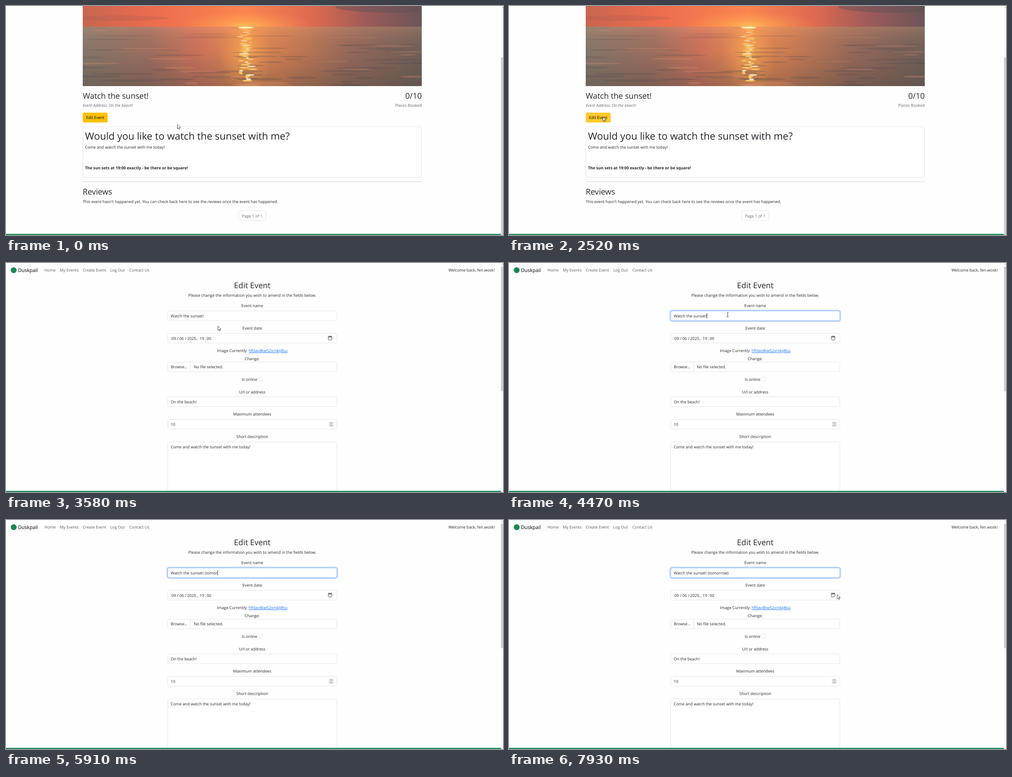
Write an HTML page that moves like this. It is 1101 px wide and 509 px high and loops after 8 s.

```html
<!DOCTYPE html>
<html lang="en">
<head>
<meta charset="utf-8">
<title>Edit event</title>
<style>
  html, body { margin: 0; width: 100%; height: 100%; overflow: hidden; background: #fefefe; }
  svg { display: block; width: 1101px; height: 509px; }
  text {
    font: 8.79px "Open Sans", "Noto Sans", sans-serif;
    fill: #212529; white-space: pre; text-rendering: geometricPrecision;
  }
  .h1 { font-size: 21.97px; }
  .h2 { font-size: 17.57px; }
  .brand { font-size: 10.98px; fill: #000; }
  .b { font-weight: 700; }
  .i { font-style: italic; }
  .muted { fill: #62666a; }
  .nav { fill: #595959; }
  .black { fill: #000; }
  .small { font-size: 7.4px; }
  .link { fill: #0d6efd; text-decoration: underline; }
  .mid { text-anchor: middle; }
  .end { text-anchor: end; }
  .box { fill: #fff; stroke: #dee2e6; stroke-width: .9; }
</style>
</head>
<body>
<svg id="stage" viewBox="0 0 1101 509">
  <defs>
    <clipPath id="frame"><path d="M170 0H921V178H170Z"/></clipPath>
    <linearGradient id="sky">
      <stop offset="0" stop-color="#c8654f"/>
      <stop offset=".2" stop-color="#ec6c4e"/>
      <stop offset=".48" stop-color="#fb8450"/>
      <stop offset=".68" stop-color="#dd6950"/>
      <stop offset=".85" stop-color="#985a59"/>
      <stop offset="1" stop-color="#6b5558"/>
    </linearGradient>
    <linearGradient id="sea">
      <stop offset="0" stop-color="#87796c"/>
      <stop offset=".2" stop-color="#a1705f"/>
      <stop offset=".34" stop-color="#d4745a"/>
      <stop offset=".48" stop-color="#f0924f"/>
      <stop offset=".6" stop-color="#d57f52"/>
      <stop offset=".78" stop-color="#9b6b59"/>
      <stop offset="1" stop-color="#716059"/>
    </linearGradient>
    <linearGradient id="depth" x2="0" y2="1">
      <stop offset="0" stop-color="#ffb08a" stop-opacity=".2"/>
      <stop offset=".4" stop-color="#5b4d4c" stop-opacity=".08"/>
      <stop offset="1" stop-color="#45413f" stop-opacity=".4"/>
    </linearGradient>
    <radialGradient id="glow">
      <stop offset="0" stop-color="#ffd966"/>
      <stop offset=".3" stop-color="#ffae4f" stop-opacity=".8"/>
      <stop offset="1" stop-color="#ff9450" stop-opacity="0"/>
    </radialGradient>
  </defs>
  <g id="detail"></g>
  <g id="form"></g>
  <path d="M0 506.5H1097V509H0Z" fill="#198754"/>
  <path d="M1096.5 0H1101V509H1096.5Z" fill="#fafafa"/>
  <rect id="thumb" x="1096.5" width="4.5" fill="#cdcdcd"/>
  <path d="M1098.5 4L1100 2.5L1101 3.5" fill="none" stroke="#777" stroke-width=".9"/>
  <g id="mouse"></g>
</svg>
<script>
const $ = id => document.getElementById(id);

const text = (x, y, str, cls = '') => `<text x="${x}" y="${y}" class="${cls}">${str}</text>`;
const box = (x, y, w, h, r = 3.5) =>
  `<rect x="${x}" y="${y}" width="${w}" height="${h}" rx="${r}" class="box"/>`;
const blob = (x, y, rx, ry, fill, alpha = 1) =>
  `<ellipse cx="${x}" cy="${y}" rx="${rx}" ry="${ry}" fill="${fill}" opacity="${alpha}"/>`;

let seed = 11;
const rand = () => (seed = seed * 16807 % 2147483647) / 2147483647;

function photo() {
  let out = '<path d="M170 0H921V46H170Z" fill="url(#sky)"/>' +
    blob(860, 2, 130, 13, '#5d5058', .45) + blob(250, 27, 110, 6, '#a85e55', .3) +
    blob(531, 44, 150, 34, 'url(#glow)', .75) +
    '<path d="M170 46H921V178H170Z" fill="url(#sea)"/>' +
    '<path d="M170 46H921V178H170Z" fill="url(#depth)"/>' +
    blob(531, 100, 60, 95, 'url(#glow)', .5);
  for (let i = 0; i < 75; i++) {
    const d = rand(), x = 170 + rand() * 751;
    const dark = rand() < .65;
    out += blob(x, 49 + d * 128, 14 + rand() * 60, .5 + d * 2.4,
      dark ? '#4b4a4b' : '#f59a70', dark ? .25 : .22);
  }
  for (let i = 0; i < 38; i++) {
    const d = i / 38;
    const spread = 14 + 8 * Math.sin(d * 11);
    out += blob(532 + (rand() - .5) * spread * 1.5, 49 + d * 120, 3 + rand() * 10, .6 + d * 1.3,
      i % 3 ? '#ffd873' : '#fff6cf', .85);
  }
  return `<g clip-path="url(#frame)">${out}${blob(531, 48, 17, 2.2, '#fff3b0')}</g>`;
}

$('detail').innerHTML = photo() +
  text(170, 206, 'Watch the sunset!', 'h2') +
  text(921, 206, '0/10', 'h2 end') +
  text(170, 224, 'Event Address: On the beach!', 'i muted') +
  text(921, 224, 'Places Booked', 'muted end') +
  '<rect id="button" x="170" y="237" width="55.3" height="22" rx="3.5"/>' +
  text(197.7, 251.3, 'Edit Event', 'black mid') +
  box(170.5, 268.5, 750, 112) +
  text(175, 297, 'Would you like to watch the sunset with me?', 'h1') +
  text(175, 316.5, 'Come and watch the sunset with me today!') +
  text(175, 362.8, 'The sun sets at 19:00 exactly - be there or be square!', 'b') +
  '<path d="M170 390.5H921" stroke="#d0d1d2"/>' +
  text(170, 419, 'Reviews', 'h2') +
  text(170, 437.5, "This event hasn't happened yet. You can check back here to see the reviews once the event has happened.") +
  box(515.3, 454.7, 60.4, 21.8) +
  text(545.3, 469.7, 'Page 1 of 1', 'muted mid');

const label = (y, str, cls = '') => text(545.5, y, str, 'mid ' + cls);
const field = (y, h = 21.6) => box(358.3, y, 374.6, h);
const nav = [[85.3, 'Home'], [119.3, 'My Events'], [170, 'Create Event'], [230.8, 'Log Out'], [273.3, 'Contact Us']];
const date = [[366.5, '09'], [379, '/'], [384, '06'], [396.5, '/'], [401.2, '2025'], [422.5, ','],
  [429, '19'], [440.7, ':'], [444.5, '00']];

$('form').innerHTML =
  '<circle cx="17" cy="16" r="6.5" fill="#198754"/>' +
  text(26.5, 19.5, 'Duskpail', 'brand') +
  nav.map(([x, s]) => text(x, 19.2, s, 'nav')).join('') +
  text(1082.5, 19.2, 'Welcome back, fen.wosk!', 'end') +
  label(56, 'Edit Event', 'h2') +
  label(74.8, 'Please change the information you wish to amend in the fields below.') +
  label(98, 'Event name') + field(106.6) +
  '<g id="focus" fill="none"><rect x="356.7" y="105" width="377.8" height="24.8" rx="5" stroke="#0d6efd" stroke-opacity=".25" stroke-width="2.4"/>' +
  '<rect x="358.3" y="106.6" width="374.6" height="21.6" rx="3.5" stroke="#86b7fe" stroke-width=".9"/></g>' +
  text(365, 120.6, '').replace('<text', '<text id="name"') +
  '<path id="caret" d="M0 111.5V123" stroke="#111" stroke-width=".9"/>' +
  label(148, 'Event date') + field(156.3) +
  date.map(([x, s]) => text(x, 170.6, s)).join('') +
  '<g fill="none" stroke="#4a4a4f"><rect x="714" y="163" width="8" height="8" rx="1.2"/>' +
  '<path d="M714 164.3H722" stroke-width="1.6"/><path d="M716 161.5V163M720 161.5V163"/></g>' +
  label(198, 'Image Currently: <tspan class="link">hftlavdkw52xri4zj8su</tspan>') +
  label(216.3, 'Change:') + field(220.2) +
  '<path d="M408.5 220.2V241.8" stroke="#dee2e6" stroke-width=".9"/>' +
  text(365, 234.4, 'Browse...') + text(416, 234.4, 'No file selected.') +
  text(522.3, 261.6, 'Is online') + box(559.3, 253.8, 8.8, 8.8, 2) +
  label(289.5, 'Url or address') + field(297.6) + text(365, 311.9, 'On the beach!') +
  label(339.3, 'Maximum attendees') + field(347.6) + text(365, 361.8, '10') +
  '<rect x="715.2" y="352.5" width="10.6" height="11.6" rx="1.5" fill="#e6e6ea"/>' +
  '<path d="M718.3 356.6L720.5 354.6L722.7 356.6M718.3 360L720.5 362L722.7 360" fill="none" stroke="#55555c" stroke-width=".9"/>' +
  label(389, 'Short description') + field(397.7, 140) +
  text(365, 411.8, 'Come and watch the sunset with me today!') +
  '<g id="suggest"><path d="M358.5 129.5H733.5V140.8H358.5Z" fill="#fff" stroke="#d2d2d6" stroke-width=".8"/>' +
  text(362, 137.8, 'Watch the sunset!', 'small') + '</g>';

const cursors = {
  arrow: '<path d="M0 0V9.6L2.3 7.6L3.8 11L5.4 10.3L3.9 7H6.8Z" fill="#fff" stroke="#222" stroke-width=".8"/>',
  hand: '<path d="M-.8 6.6V1.2Q0 -.2 .9 1.2V4.7L4.9 5.5Q6 5.9 5.7 8L4.8 12.2H-.2L-3.2 8.2Q-3.2 6.6 -1.8 7.4Z" fill="#fff" stroke="#222" stroke-width=".8"/>',
  beam: '<path d="M-2.2 -5H-.6L0 -4.4L.6 -5H2.2M0 -4.4V4.2M-2.2 4.8H-.6L0 4.2L.6 4.8H2.2" fill="none" stroke="#222" stroke-width=".9"/>',
  none: ''
};

// start time, cursor, x, y
const moves = [
  [0, 'arrow', 379.8, 263.2], [150, 'arrow', 371, 261], [270, 'arrow', 337, 253],
  [390, 'arrow', 286, 241], [520, 'arrow', 242, 232], [640, 'hand', 219, 237],
  [760, 'hand', 210, 243], [880, 'hand', 208, 246.5], [2520, 'arrow', 208, 246.5],
  [2950, 'arrow', 221, 241], [3070, 'arrow', 262, 223], [3190, 'arrow', 319, 199],
  [3310, 'arrow', 349.3, 186.5], [3460, 'arrow', 421, 157], [3580, 'arrow', 469.5, 140],
  [3730, 'beam', 481, 122], [3850, 'beam', 484.5, 115], [4750, 'none', 0, 0],
  [7000, 'beam', 484.5, 115], [7120, 'beam', 447, 108], [7240, 'arrow', 560, 183],
  [7370, 'arrow', 688, 184], [7490, 'arrow', 750, 170], [7640, 'arrow', 745.3, 165.5],
  [7790, 'arrow', 730.5, 164.5], [7930, 'arrow', 727, 165.5]
];

const added = ' (tomorrow)';
const keyTimes = [4750, 5120, 5370, 5490, 5640, 5790, 5910, 6060, 6060, 6200, 6320];
const LOOP = 8000, OPEN_FORM = 2680;

const show = (id, on) => $(id).style.display = on ? '' : 'none';
const within = (t, a, b) => t >= a && t < b;
let lastName, lastCursor;

function draw(now) {
  const t = now % LOOP, onForm = t >= OPEN_FORM;
  show('detail', !onForm);
  show('form', onForm);
  $('thumb').setAttribute('y', onForm ? 8 : 114);
  $('thumb').setAttribute('height', onForm ? 277 : 395);
  $('button').setAttribute('fill', t >= 640 ? '#ffca2c' : '#ffc107');

  if (onForm) {
    const name = 'Watch the sunset!' + added.slice(0, keyTimes.filter(k => t >= k).length);
    if (name !== lastName) {
      $('name').textContent = lastName = name;
      const x = 365.4 + $('name').getComputedTextLength();
      $('caret').setAttribute('transform', `translate(${x} 0)`);
    }
    $('focus').style.opacity = t < 4350 ? 0 : t < 4470 ? .6 : 1;
    show('caret', within(t, 4350, 6860) || within(t, 7370, 7930));
    show('suggest', within(t, 4750, 5120));
  }

  const [, kind, x, y] = moves.filter(m => t >= m[0]).pop();
  if (kind !== lastCursor) $('mouse').innerHTML = cursors[lastCursor = kind];
  $('mouse').setAttribute('transform', `translate(${x} ${y})`);
}

const start = performance.now();
function tick() {
  draw(performance.now() - start);
  requestAnimationFrame(tick);
}
tick();
</script>
</body>
</html>
```
